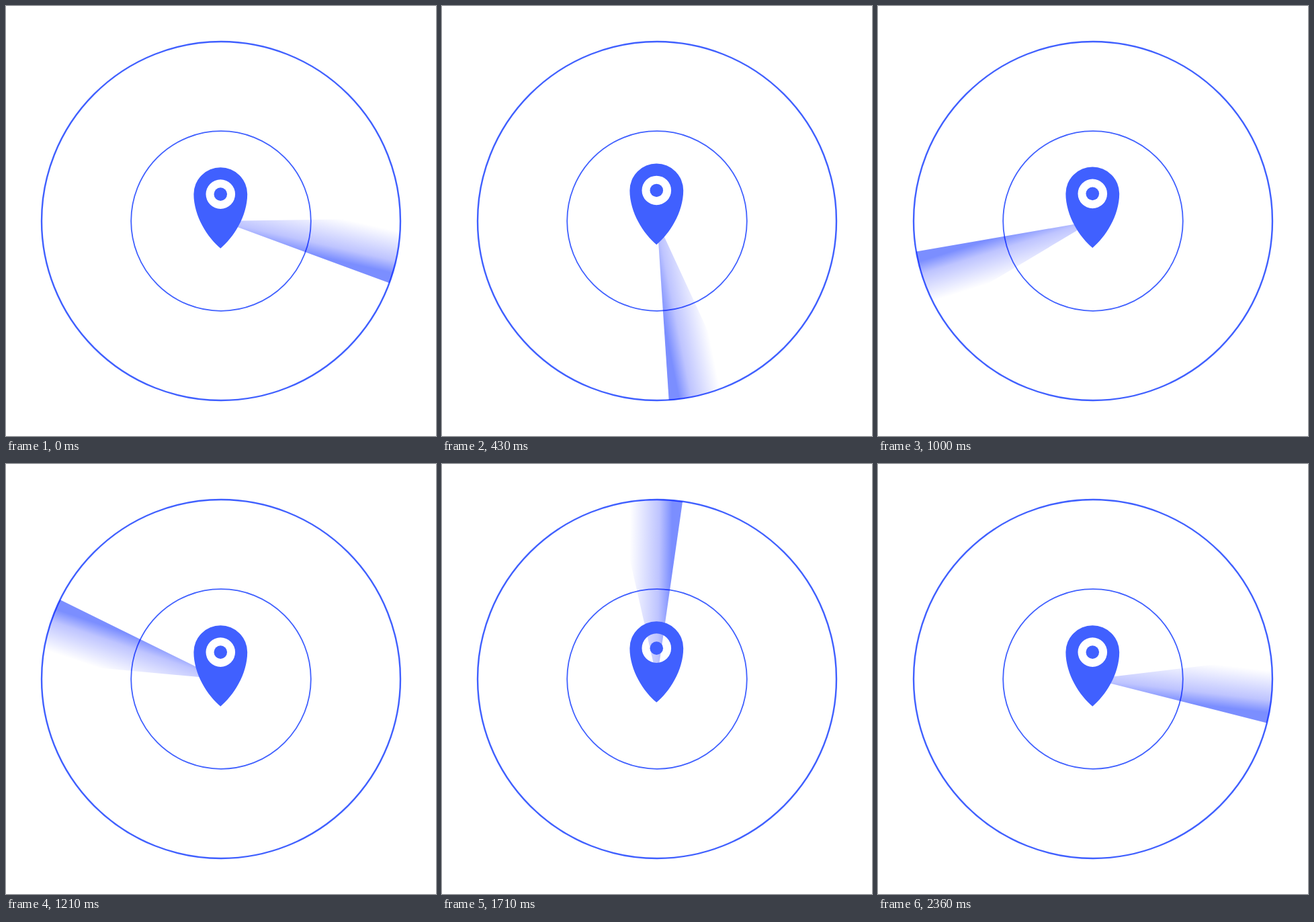
An HTML page for the animation above (2430 ms loop, 640 by 640 pixels).

```html
<!DOCTYPE html>
<html lang="en">
<head>
<meta charset="utf-8">
<title>Location radar</title>
<style>
  html, body { margin: 0; width: 100%; height: 100%; overflow: hidden; background: #fff; }
  svg { display: block; width: 100%; height: 100%; background: #fff; }
  .ring { fill: none; stroke: #4060ff; }
  #beam { mix-blend-mode: multiply; }
</style>
</head>
<body>
<svg viewBox="0 0 640 640">
  <defs>
    <linearGradient id="fade" gradientUnits="userSpaceOnUse" x1="0" y1="35" x2="0" y2="-43">
      <stop offset="0" stop-color="#7b8eff"/>
      <stop offset=".2" stop-color="#7b8eff"/>
      <stop offset=".44" stop-color="#bec4ff"/>
      <stop offset="1" stop-color="#fff"/>
    </linearGradient>
  </defs>
  <circle class="ring" cx="320" cy="320" r="267" stroke-width="2.4"/>
  <circle class="ring" cx="320" cy="320" r="133.8" stroke-width="1.8"/>
  <path id="beam" fill="url(#fade)"/>
  <g id="pin" fill="#4060ff">
    <path fill-rule="evenodd" d="M0 80.7C-19 65 -39.9 33 -39.9 0A39.9 39.9 0 0 1 39.9 0C39.9 33 19 65 0 80.7Z
      M-21.8 0A21.8 21.8 0 0 0 21.8 0A21.8 21.8 0 0 0 -21.8 0Z"/>
    <circle r="9.8"/>
  </g>
</svg>
<script>
const LOOP = 2430, FRAMES = 34, FPS = 14, STEP_FPS = 25;
const RADIUS = 267, LEAD = 7.5, TRAIL = -13.5, START = 12.7;
const BOB = 6, HALF_BOB = 15;

const beam = document.getElementById('beam');
const pin = document.getElementById('pin');

const rim = deg => {
  const a = deg * Math.PI / 180;
  return `${RADIUS * Math.cos(a)} ${RADIUS * Math.sin(a)}`;
};
beam.setAttribute('d', `M0 0L${rim(TRAIL)}A${RADIUS} ${RADIUS} 0 0 1 ${rim(LEAD)}Z`);

// Frame times are rounded to 10 ms.
const starts = Array.from({ length: FRAMES }, (_, k) => Math.round(k * 100 / FPS) * 10);

const ease = u => u < 0.5
  ? 0.5 * (2 * u) ** 3.5
  : 1 - 0.5 * (2 - 2 * u) ** 3.5;

function draw(time) {
  const t = time % LOOP;
  let k = FRAMES - 1;
  while (k > 0 && starts[k] > t) k--;

  const step = Math.ceil(k * STEP_FPS / FPS);
  const phase = step % (2 * HALF_BOB);
  const rise = BOB * ease(1 - Math.abs(phase / HALF_BOB - 1));

  beam.setAttribute('transform', `translate(320 320) rotate(${START + 6 * step})`);
  pin.setAttribute('transform', `translate(319.3 ${280.1 - rise})`);
}

const origin = performance.now();
function tick() {
  draw(performance.now() - origin);
  requestAnimationFrame(tick);
}
draw(0);
requestAnimationFrame(tick);
</script>
</body>
</html>
```
